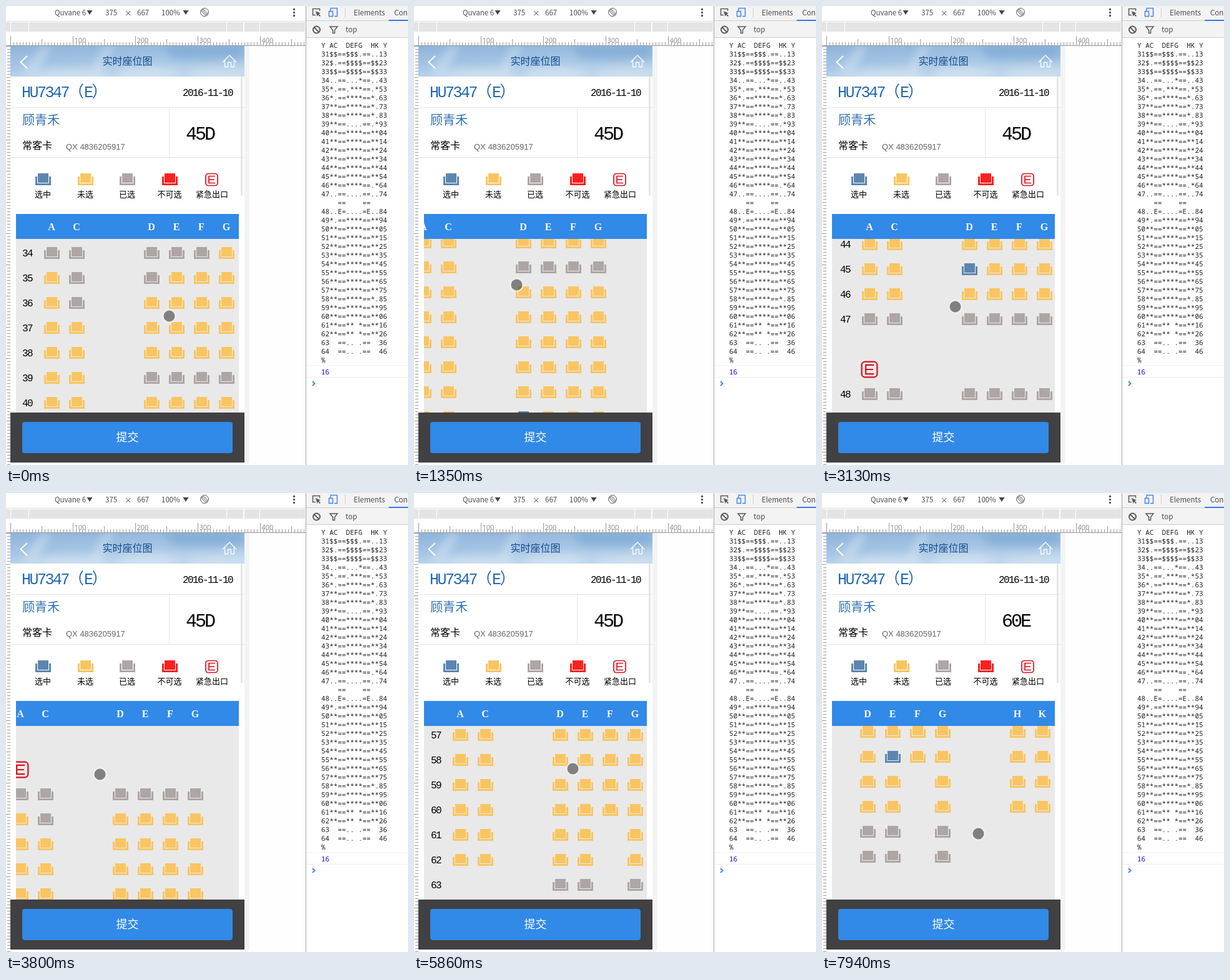
Write an HTML page that moves like this. It is 644x735 px and loops after 8000 ms.

```html
<!DOCTYPE html>
<html lang="zh-CN">
<head>
<meta charset="utf-8">
<style>
html, body { margin: 0; width: 100%; height: 100%; overflow: hidden; background: #fefefe; }
svg { display: block; }
text { font-family: "Noto Sans CJK SC", "Noto Sans CJK", sans-serif; font-weight: 300; }
.num, .num tspan { font-family: "Liberation Mono", "Noto Sans CJK SC", monospace; letter-spacing: -.1em; }
.num .wide { letter-spacing: 0; }
.mid { text-anchor: middle; }
.ui { font: 11.5px "Open Sans", sans-serif; fill: #4a4a4a; }
.code { font: 11px "Noto Sans Mono", monospace; white-space: pre; fill: #222; }
.cols text { font: bold 16px "Liberation Serif", serif; fill: #fff; }
.mark { font: 11px "Open Sans", sans-serif; fill: #888; }
.line { fill: none; stroke: #e4e4e4; }
</style>
</head>
<body>
<svg width="644" height="735" viewBox="0 0 644 735">
  <defs>
    <path id="seat" d="M-12-5h3v11h19v-11h3v14h-25zM-8-10h17v15h-17z"/>
    <g id="exit" fill="none" stroke="#d9101c" stroke-width="1.7">
      <rect x="-9.5" y="-9.5" width="19" height="19" rx="4"/>
      <path d="M5.5-5.5h-10v11h10M-4.5 0h9"/>
    </g>
    <linearGradient id="sky" x2=".35" y2="1">
      <stop stop-color="#8fb4da"/><stop offset=".55" stop-color="#a3c4e4"/><stop offset="1" stop-color="#bdd5eb"/>
    </linearGradient>
    <filter id="soft"><feGaussianBlur stdDeviation="7"/></filter>
    <clipPath id="bar"><path d="M7 64h375v49H7z"/></clipPath>
    <clipPath id="head"><path d="M16 333h357v40H16z"/></clipPath>
    <clipPath id="body"><path d="M16 373h357v278H16z"/></clipPath>
  </defs>

  <!-- device toolbar and rulers -->
  <path fill="#fff" d="M0 0h480v64H0z"/>
  <path fill="#e4e4e4" d="M0 26h7v15H0zM8 26h28v15H8zM37 26h316v15H37zM354 26h26v15h-26zM382 26h24v15h-24zM407 26h72v15h-72z"/>
  <path stroke="#ddd" d="M0 24.5h480"/>
  <g class="ui">
    <text x="78" y="15">Quvane 6</text><text x="159" y="15">375</text>
    <text x="190" y="16">×</text><text x="210" y="15">667</text><text x="249" y="15">100%</text>
  </g>
  <path fill="#444" d="M129.500 7h9l-4.500 7zM283.500 7h9l-4.500 7z"/>
  <g fill="none" stroke="#555"><circle cx="318" cy="10" r="6.500"/><path d="M313 8l3-3 7 7-3 3zM313 5l10 10"/></g>
  <path fill="#555" d="M460 4h3v3h-3zM460 9h3v3h-3zM460 14h3v3h-3z"/>
  <g id="ruler"></g>

  <!-- phone page -->
  <rect x="7" y="64" width="383" height="669" rx="4" fill="#f4f4f4"/>
  <path fill="#fff" d="M7 64h375v667H7z"/>
  <g clip-path="url(#bar)">
    <path fill="url(#sky)" d="M7 64h375v49H7z"/>
    <g filter="url(#soft)" fill="#dbe8f4" opacity=".6">
      <ellipse cx="105" cy="110" rx="60" ry="9"/><ellipse cx="225" cy="108" rx="50" ry="10"/>
      <ellipse cx="345" cy="112" rx="55" ry="8"/><path d="M60 64h12l-30 49H24zM160 64h12l-22 40h-14z"/>
      <path fill="#78a4d0" d="M250 60h132v25H270z"/>
    </g>
  </g>
  <g fill="none" stroke="#fff">
    <path stroke-width="2" d="M34 80L23.500 90 34 100"/>
    <path stroke-width="1.300" d="M347 90l11-11 11 11M350.500 87v10.500h5v-7h5v7h5V87"/>
  </g>
  <text class="mid" x="194.500" y="94" font-size="16" fill="#174a8c" style="font-weight:400">实时座位图</text>
  <text class="num" x="25" y="146" font-size="25" fill="#2468b0">HU7347<tspan class="wide">（</tspan>E<tspan class="wide">）</tspan></text>
  <text class="num" x="283" y="144" font-size="16">2016-11-10</text>
  <path class="line" d="M7 162.500h375M7 242.500h375M261.500 163v79"/>
  <text x="26" y="190" font-size="20" fill="#3273b5">顾青禾</text>
  <text x="26" y="229" font-size="16" style="font-weight:400">常客卡</text>
  <text x="96" y="230" font-size="13" fill="#666" style="font-family:'Liberation Sans',sans-serif">QX 4836205917</text>
  <text id="choice" class="num" x="288" y="214" font-size="30">45D</text>
  <rect x="376" y="113" width="3" height="191" rx="1.500" fill="#e6e6e6"/>
  <g id="legend" class="mid" font-size="13"></g>

  <path fill="#e9e9e9" d="M16 373h357v278H16z"/>
  <path fill="#3189e8" d="M16 333h357v40H16z"/>
  <g clip-path="url(#head)"><g id="cols" class="cols mid"></g></g>
  <g clip-path="url(#body)"><g id="rows"></g></g>
  <path fill="#414042" d="M7 651h375v80H7z"/>
  <rect x="26" y="666" width="337" height="50" rx="4" fill="#3189e8"/>
  <text class="mid" x="194.500" y="697" font-size="18" fill="#fff">提交</text>
  <circle id="touch" r="10" fill="#000" fill-opacity=".45" stroke="#f4f4f4" stroke-opacity=".9" stroke-width="2"/>

  <!-- console panel -->
  <path fill="#fff" d="M481 0h163v735H481z"/>
  <path fill="#f3f3f3" d="M481 0h163v50H481z"/>
  <path stroke="#ccc" d="M481 23.500h163M481 50.500h163M543.500 3v15"/>
  <path stroke="#a3a3a3" d="M480.500 0v735"/>
  <path stroke="#eee" d="M481 575.500h163M481 594.500h163"/>
  <path fill="#3b78e7" d="M613 22h31v2h-31z"/>
  <g fill="none" stroke="#5a5a5a" stroke-width="1.500">
    <path d="M496 14.500h-4.500v-10h11V8"/><path fill="#5a5a5a" stroke="none" d="M496 8l8 3.500-3 1.200 3 3-1.300 1.300-3-3-1.200 3z"/>
    <circle cx="497.500" cy="38" r="5.500" stroke-width="2"/><path stroke-width="2" d="M494 34.500l7 7"/>
    <path d="M519 33h12l-4.500 5.500v5h-3v-5z"/>
    <path stroke="#4285f4" d="M520 8V3.500h10.500v13H526M517.500 8.500h6v8h-6z"/>
    <path stroke="#4285f4" stroke-width="2" d="M491 601l3.500 3.500-3.500 3.500"/>
  </g>
  <g class="ui" fill="#5a5a5a"><text x="557" y="15">Elements</text><text x="622" y="15">Console</text><text x="544" y="42">top</text></g>
  <g id="log"></g>
  <text class="code" x="505" y="590" style="fill:#1c00cf">16</text>
</svg>
<script>
const $ = id => document.getElementById(id);
const BLUE = '#5d86af', YELLOW = '#f9c562', GREY = '#aea6a4', RED = '#fb2020';
const COLS = 'AC  DEFG  HK';
const FULL = '**==****==**', TAIL = '**==** *==**', LAST = '  ==.. .==  ';
const PLAN = {
  31: '$$==$$$.==..', 32: '$.==$$$$==$$', 33: '$$==$$$$==$$', 34: '..==...*==..',
  35: '*.==.***==.*', 36: '*.==****==*.', 37: '**==****==*.', 38: '**==****==*.',
  39: '**==....==.*', 46: '**==****==.*', 47: '..==....==..', 48: '..E=....=E..',
  49: '*.==****==**', 58: '**==****==*.', 61: TAIL, 62: TAIL, 63: LAST, 64: LAST
};
const text = (x, y, s, cls = '') => `<text x="${x}" y="${y}" class="${cls}">${s}</text>`;
const seat = (x, y, fill, id = '') => `<use href="#seat" x="${x}" y="${y}" fill="${fill}" id="${id}"/>`;
const exit = (x, y, k) => `<use href="#exit" transform="translate(${x} ${y}) scale(${k})"/>`;

// rulers: small tick each 5px, medium each 50px, large each 100px
let ticks = 'M0 63.5H480', marks = '';
for (let i = 0; i < 135; i++) {
  const len = i % 20 ? i % 10 ? 5 : 10 : 15, p = 7.5 + i * 5;
  if (p < 480) ticks += `M${p} 63v${-len}`;
  ticks += `M7 ${p + 57}h${-Math.min(len, 7)}`;
  if (i && i % 20 == 0 && p < 480) marks += text(p + 2, 59, i * 5, 'mark');
}
$('ruler').innerHTML = `<path d="${ticks}" stroke="#999"/>` + marks;

$('legend').innerHTML = [[59, '选中', BLUE], [127, '未选', YELLOW], [194, '已选', GREY], [262, '不可选', RED], [330, '紧急出口']]
  .map(([x, s, c]) => (c ? seat(x, 278, c) : exit(329.5, 278, 1)) + text(x, 306, s)).join('');

$('cols').innerHTML = [...COLS].map((c, i) => text(73 + i * 40, 359, c)).join('');

// the seat plan feeds both the log and the map
const log = ['Y AC  DEFG  HK Y'];
let rows = '', y = 396;
for (let n = 31; n < 65; n++) {
  const plan = PLAN[n] || FULL;
  if (n == 48) {
    log.push('    ==    ==');
    rows += exit(73, y + 40, 1.3) + exit(513, y + 40, 1.3);
    y += 80;
  }
  log.push(n + plan + [...String(n)].reverse().join(''));
  if (n < 34) continue;
  rows += `<text class="num" font-size="16" x="26" y="${y + 5}">${n}</text>`;
  [...plan].forEach((c, i) => {
    if (c == '*' || c == '.') rows += seat(73 + i * 40, y, c == '*' ? YELLOW : GREY, 's' + n + COLS[i]);
  });
  y += 40;
}
log.push('%');
$('rows').innerHTML = rows;
$('log').innerHTML = log.map((s, i) => text(505, 67 + i * 14, s, 'code')).join('');

// time, scroll x, scroll y, touch x, touch y
const KEYS = [
  [0, 0, 0, 261, 496], [1350, -58, -177, 164, 446], [2220, -40, -270, 202, 455],
  [2340, -7, -283, 235, 450], [2700, 3, -330, 245, 420], [3260, 3, -440, 203, 500],
  [3800, -50, -553, 150, 450], [5130, -21, -685, 176, 558], [5400, 3, -770, 200, 490],
  [6000, 0, -1093, 273, 423], [6550, 0, -1093, 273, 493], [6700, -54, -1085, 219, 501],
  [7200, -130, -1060, 190, 520], [7670, -160, -1105, 250, 533], [7940, -160, -1093, 250, 545], [8000, -160, -1093, 250, 545]
];
// the picture is refreshed in steps of about 133ms between these times
const BEATS = [0, 140, 1110, 1230, 1350, 2220, 2340, 3260, 3400, 3800, 4340, 4460, 5130, 5400, 5560, 6550, 6700, 7670, 7820, 7940, 8000];

function snap(t) {
  const i = BEATS.findLastIndex(b => b <= t), a = BEATS[i], gap = BEATS[i + 1] - a;
  const n = Math.max(1, Math.round(gap / 133));
  return a + Math.floor((t - a) / gap * n) * gap / n;
}

function draw(now) {
  const t = snap(now % 8000);
  const i = KEYS.findLastIndex(k => k[0] <= t), a = KEYS[i], b = KEYS[i + 1];
  const u = (t - a[0]) / (b[0] - a[0]);
  const [, sx, sy, px, py] = a.map((v, j) => Math.round(v + (b[j] - v) * u));
  $('cols').setAttribute('transform', `translate(${sx} 0)`);
  $('rows').setAttribute('transform', `translate(${sx} ${sy})`);
  $('touch').setAttribute('transform', `translate(${px + .5} ${py + .5})`);
  const moved = t > 6100;
  $('choice').textContent = moved ? '60E' : '45D';
  $('s45D').setAttribute('fill', moved ? YELLOW : BLUE);
  $('s60E').setAttribute('fill', moved ? BLUE : YELLOW);
  requestAnimationFrame(draw);
}
draw(performance.now());
</script>
</body>
</html>
```
